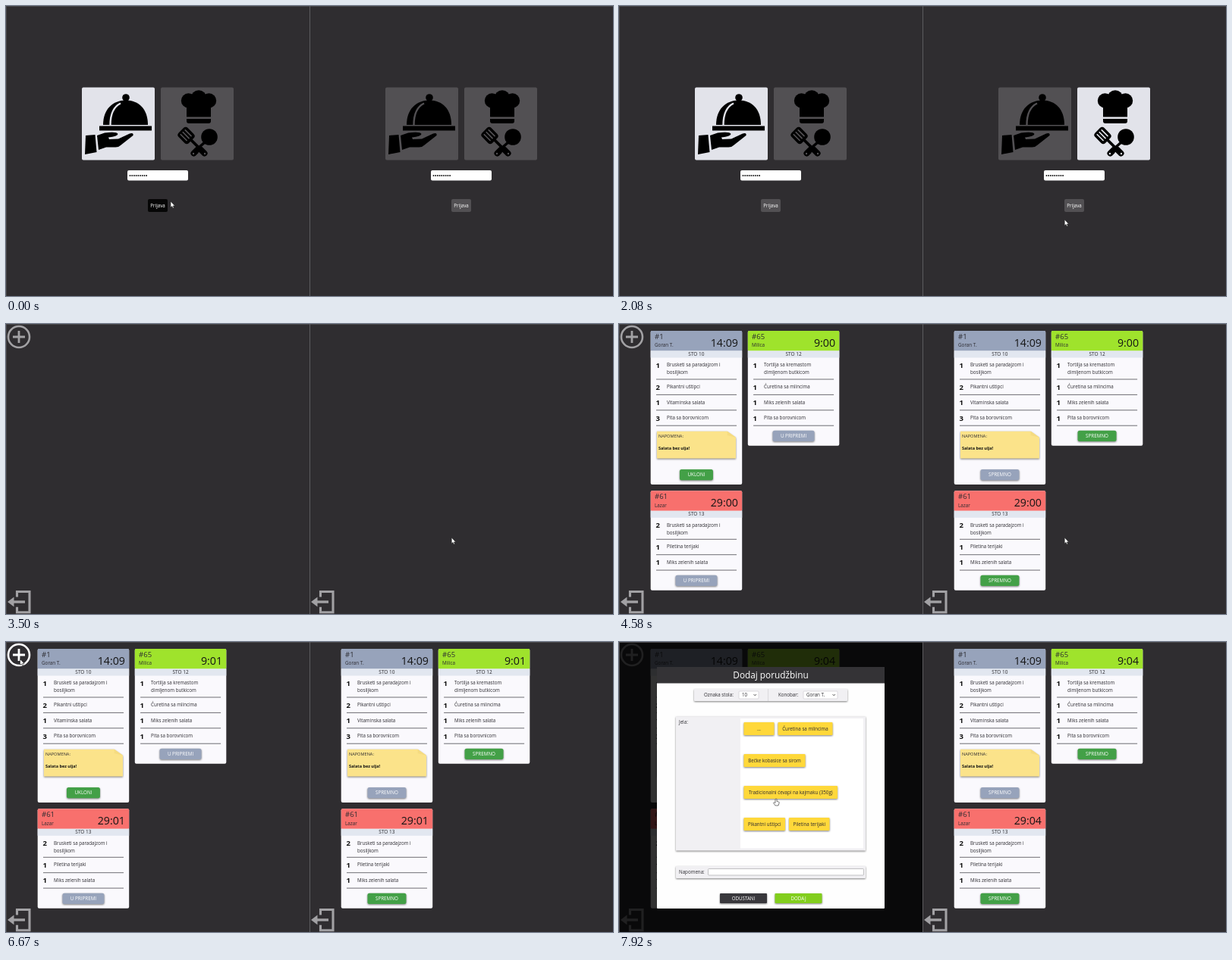
These frames come from a looping animation (800x383 px, 8000 ms). An HTML page:

```html
<!DOCTYPE html>
<html lang="sr">
<head>
<meta charset="utf-8">
<title>Porudžbine</title>
<style>
  html, body { margin: 0; height: 100%; overflow: hidden; background: #2f2d30; }
  svg { display: block; width: 100%; height: 100%; }
  text { font-family: "Open Sans", "Noto Sans", sans-serif; white-space: pre; }
  .raised { filter: drop-shadow(0 1px 1px rgba(0, 0, 0, .5)); }
</style>
</head>
<body>
<svg id="stage" viewBox="0 0 800 383"></svg>
<script>
const stage = document.getElementById('stage');
const LOOP = 8000;
const LIGHT = '#e2e3ea', DIM = '#525053', INK = '#2c2b30';
const GREEN = '#43a047', SLATE = '#97a3bb';
const WAITERS = ['Goran T.', 'Milica', 'Lazar'];

const rect = (x, y, w, h, fill, extra = '') =>
  `<rect x="${x}" y="${y}" width="${w}" height="${h}" fill="${fill}" ${extra}/>`;
const text = (x, y, str, size = 6.2, fill = INK, extra = '') =>
  `<text x="${x}" y="${y}" font-size="${size}" fill="${fill}" ${extra}>${str}</text>`;
const path = (d, extra = '') => `<path d="${d}" ${extra}/>`;
const stroke = (d, color, width, extra = '') =>
  path(d, `fill="none" stroke="${color}" stroke-width="${width}" ${extra}`);
const circle = (x, y, r, fill = '#000') => `<circle cx="${x}" cy="${y}" r="${r}" fill="${fill}"/>`;
const group = (x, y, body, more = '') => `<g transform="translate(${x} ${y}) ${more}">${body}</g>`;
const MIDDLE = 'text-anchor="middle"', BOLD = 'font-weight="700"';

function button(x, y, w, h, label, fill, color = '#fff', size = 6.3, r = 2.5) {
  return rect(x, y, w, h, fill, `rx="${r}" class="raised"`) +
    text(x + w / 2, y + h / 2 + size * .36, label, size, color, MIDDLE);
}

// Login screen

function waiterTile(fill) {
  return rect(100, 107.5, 96, 96, fill, 'rx="2"') +
    circle(158, 121, 4.8) +
    path('M128 157C128 136 141 124.500 158 124.500S187 136 187 157Z') +
    stroke('M137.500 157C137.500 143 142 133 151 128.500', fill, 2.4) +
    rect(123, 158.5, 69, 6, '#000') +
    path('M105 171L117.500 170 119.500 193 104 196Z') +
    path('M120 171L130 167.500Q146 165.500 147.500 169 147 172 135 173.500L136 176 148 175.500' +
         ' 163 168.500Q168.500 167 167.500 171L151 184Q148 187 143 186.500L132 186.500 122 190Z');
}

function chefTile(fill) {
  const slots = [-4.2, 0, 4.2].map(x => stroke(`M${x} -6V5`, fill, 1.7, 'stroke-linecap="round"')).join('');
  const grip = d => stroke(d, fill, 10) + stroke(d, '#000', 8, 'stroke-linecap="round"');
  return rect(204, 107.5, 96, 96, fill, 'rx="2"') +
    circle(240.5, 125, 9.7) + circle(254, 121.5, 10.3) + circle(267.5, 125, 9.7) +
    path('M238 128H270V146.500H238Z') +
    path('M238 149H270V152Q270 155 267 155H241Q238 155 238 152Z') +
    stroke('M263 179L253 188', '#000', 3.5) + grip('M252 190L247.500 194.500') +
    circle(268, 173, 10.8) +
    group(237.5, 171, rect(-8.5, -9.5, 17, 19, '#000', 'rx="4"') + slots, 'rotate(-45)') +
    stroke('M243 176L255 188', '#000', 3.8) + grip('M257 190L261.500 194.500') +
    circle(247, 195, 1.2, fill) + circle(262, 195, 1.2, fill);
}

function login(waiterOn, chefOn, pressed) {
  const dots = Array.from({ length: 9 }, (_, i) => circle(163.5 + i * 2.7, 224, .95, '#111')).join('');
  return waiterTile(waiterOn ? LIGHT : DIM) + chefTile(chefOn ? LIGHT : DIM) +
    rect(160, 217, 80, 13.5, '#fff', 'rx="2"') + dots +
    rect(187, 255, 26, 17, pressed ? '#060606' : DIM, 'rx="2"') +
    text(200, 266, 'Prijava', 6.2, '#fff', MIDDLE);
}

// Order board

const addIcon = color =>
  `<circle cx="17" cy="17" r="14" fill="none" stroke="${color}" stroke-width="2.6"/>` +
  stroke('M9 17H25M17 9V25', color, 2.8);
const exitIcon = color =>
  stroke('M14.500 360.500V353.500H31V380.800H14.500V373.800', color, 3.1) +
  stroke('M8 367H25', color, 3.4) + path('M2 367L10.500 360.500V373.500Z', `fill="${color}"`);

const orders = [
  { x: 41.7, y: 9, h: 203, color: SLATE, id: 1, table: 10, note: true,
    items: [[1, 'Brusketi sa paradajzom i', 'bosiljkom'], [2, 'Pikantni uštipci'],
            [1, 'Vitaminska salata'], [3, 'Pita sa borovnicom']],
    actions: [['UKLONI', 44, GREEN], ['SPREMNO', 51, SLATE]] },
  { x: 169.8, y: 9, h: 151.7, color: '#9fe32c', id: 65, table: 12, minutes: 9,
    items: [[1, 'Tortilja sa kremastom', 'dimljenom butkicom'], [1, 'Ćuretina sa mlincima'],
            [1, 'Miks zelenih salata'], [1, 'Pita sa borovnicom']],
    actions: [['U PRIPREMI', 55, SLATE], ['SPREMNO', 51, GREEN]] },
  { x: 41.7, y: 220.3, h: 131.5, color: '#f8706d', id: 61, table: 13, minutes: 29,
    items: [[2, 'Brusketi sa paradajzom i', 'bosiljkom'], [1, 'Piletina terijaki'],
            [1, 'Miks zelenih salata']],
    actions: [['U PRIPREMI', 55, SLATE], ['SPREMNO', 51, GREEN]] },
];
const CARD_WIDTH = 120.5, ROW = 20.4;

function card(order, index, side, seconds) {
  const center = CARD_WIDTH / 2;
  const clock = order.minutes ? `${order.minutes}:0${seconds}` : '14:09';
  let body = rect(0, 0, CARD_WIDTH, order.h, '#faf9fd', 'rx="2"') +
    rect(0, 0, CARD_WIDTH, 26.5, order.color, 'rx="1.5"') +
    rect(0, 26.5, CARD_WIDTH, 9, '#e2e7f0') +
    text(5.3, 10.5, '#' + order.id, 9.5) + text(5.3, 21.3, WAITERS[index], 6.3) +
    text(115.3, 20.8, clock, 14.2, '#151515', 'text-anchor="end"') +
    text(center, 33.2, 'STO ' + order.table, 6.5, INK, MIDDLE);
  order.items.forEach(([count, ...lines], i) => {
    const y = i ? 55.8 + i * ROW : 47.4;
    body += text(6.8, y + 1.6, count, 9.5, '#111', BOLD);
    lines.forEach((line, n) => body += text(21.3, y + n * 10, line));
    body += stroke(`M7.300 ${64 + i * ROW}H113.300`, '#4b4a50', .8);
  });
  if (order.note) {
    body += path('M8.300 132.700H101L112.300 140.700V168.500H8.300Z', 'fill="#fbe38a" class="raised"') +
      path('M101 132.700V138L112.300 140.700Z', 'fill="#f5db80"') +
      text(10.3, 141, 'NAPOMENA:', 5.6) +
      text(10.3, 157.3, 'Salata bez ulja!', 5.5, '#111', BOLD);
  }
  const [label, width, fill] = order.actions[side];
  body += button(center - width / 2, order.h - 20, width, 14.2, label, fill);
  return group(order.x, order.y, body);
}

const board = (side, seconds) => orders.map((order, i) => card(order, i, side, seconds)).join('');

// New order dialog

const categories = [
  [165, 106, 40, 'PREDJELO', '#ff9040'], [209.5, 106, 52, 'GLAVNO JELO', '#ffa140'],
  [266, 106, 40, 'SALATA', '#ff9040'], [165, 189.5, 40, 'DESERT', '#ff9040'],
];
const meals = [
  [164.5, 106, 40, '...'], [209.5, 106, 72, 'Ćuretina sa mlincima'],
  [164.5, 148, 81, 'Bečke kobasice sa sirom'],
  [164.5, 190, 123.5, 'Tradicionalni ćevapi na kajmaku (350g)'],
  [164.5, 232, 54.5, 'Pikantni uštipci'], [224, 232, 53.5, 'Piletina terijaki'],
];

function select(x, w, label) {
  return rect(x, 65, w, 10, '#fff', 'rx="1" stroke="#c9c8cd" stroke-width=".6"') +
    text(x + 4, 72.3, label) + stroke(`M${x + w - 6.5} 69l1.700 1.800 1.700-1.800`, '#333', .8);
}

function dialog(showMeals) {
  const choices = (showMeals ? meals : categories).map(([x, y, w, label, fill = '#ffd83a']) =>
    button(x, y, w, 17, label, fill, INK, 6.2, 1)).join('');
  return rect(0, 0, 400, 383, '#000', 'opacity=".8"') +
    rect(50, 33, 300, 319, '#fefefe', 'rx="1"') + rect(50, 33, 300, 21.5, '#343336') +
    text(200, 48.3, 'Dodaj porudžbinu', 11.8, '#fff', MIDDLE) +
    rect(99, 62, 202, 16, '#f1f0f3', 'rx="1" class="raised"') +
    stroke('M196.500 62V78', '#d2d1d5', .7) +
    text(112, 72.3, 'Oznaka stola:') + select(158, 26, '10') +
    text(210, 72.3, 'Konobar:') + select(243, 45, WAITERS[0]) +
    rect(75, 98.5, 250, 177, '#f1f0f3', 'class="raised"') +
    rect(160, 101, 162, 171.5, '#fff') + text(79, 108, 'Jela:') + choices +
    rect(75, 296, 250, 16, '#f1f0f3', 'rx="1" class="raised"') + text(79, 306.3, 'Napomena:') +
    rect(117.5, 299.5, 205, 8.5, '#fff', 'rx="1" stroke="#aaa9ad" stroke-width=".7"') +
    button(133, 332, 62, 13, 'ODUSTANI', '#39383c', '#fff', 6.2, 1) +
    button(205.5, 332, 62, 13, 'DODAJ', '#82ce1d', '#fff', 6.2, 1);
}

// Pointer

const jumps = [[0, 217, 258], [250, 560, 180], [500, 617, 176], [920], [1080, 601, 258], [1580, 587.2, 282]];
const moves = [[5420, 587.2, 282], [6170, 50, 45], [6330, 18.5, 22.5], [7040, 18.5, 22.5],
               [7420, 236, 114], [7620, 236, 114], [7900, 207, 207]];

function pointerAt(t) {
  if (t < moves[0][0]) return jumps.findLast(([start]) => start <= t).slice(1);
  const next = moves.findIndex(([end]) => end > t);
  if (next < 0) return moves.at(-1).slice(1);
  const [t0, x0, y0] = moves[next - 1], [t1, x1, y1] = moves[next];
  const p = (t - t0) / (t1 - t0), eased = p * p * (3 - 2 * p);
  return [x0 + (x1 - x0) * eased, y0 + (y1 - y0) * eased];
}

function pointer(t) {
  const [x, y] = pointerAt(t);
  if (x === undefined) return '';
  const hand = t >= 7400 || (t >= 250 && t < 920);
  const shape = hand
    ? 'M-.500 0Q.800-.500 1 1V3.500L3.500 4Q4.500 4.500 4 6L3 9H-1L-3.500 5.500Q-3 4-1 5.500V1Z'
    : 'M0 0V8L1.800 6.400 3 9 4.300 8.400 3.200 5.900H5.600Z';
  return group(x, y, path(shape, 'fill="#fff" stroke="#222" stroke-width=".6" stroke-linejoin="round"'));
}

function scene(t) {
  let left = '', right = '';
  const modal = t >= 6720;
  const seconds = t < 5750 ? 0 : !modal ? 1 : t < 7600 ? 3 : 4;
  if (t < 2830) {
    left = login(true, false, t < 250);
    right = login(t >= 250 && t < 500, t >= 500, t >= 1250 && t < 1580);
  } else if (t >= 3420) {
    const icon = '#a2a1a4';
    left = addIcon(t >= 6300 && !modal ? '#fff' : icon) + exitIcon(icon);
    right = exitIcon(icon);
  }
  if (t >= 4580) {
    left += board(0, seconds);
    right += board(1, seconds);
  }
  if (modal) left += dialog(t >= 7540);
  return rect(0, 0, 800, 383, '#2f2d30') + left + group(400, 0, right) +
    stroke('M.500 0V383M0 .500H800', '#48474a', 1) + stroke('M400.500 0V383', '#5c5b5e', 1) +
    pointer(t);
}

let shown = '';
function frame() {
  const markup = scene(performance.now() % LOOP);
  if (markup !== shown) stage.innerHTML = shown = markup;
  requestAnimationFrame(frame);
}
frame();
</script>
</body>
</html>
```
